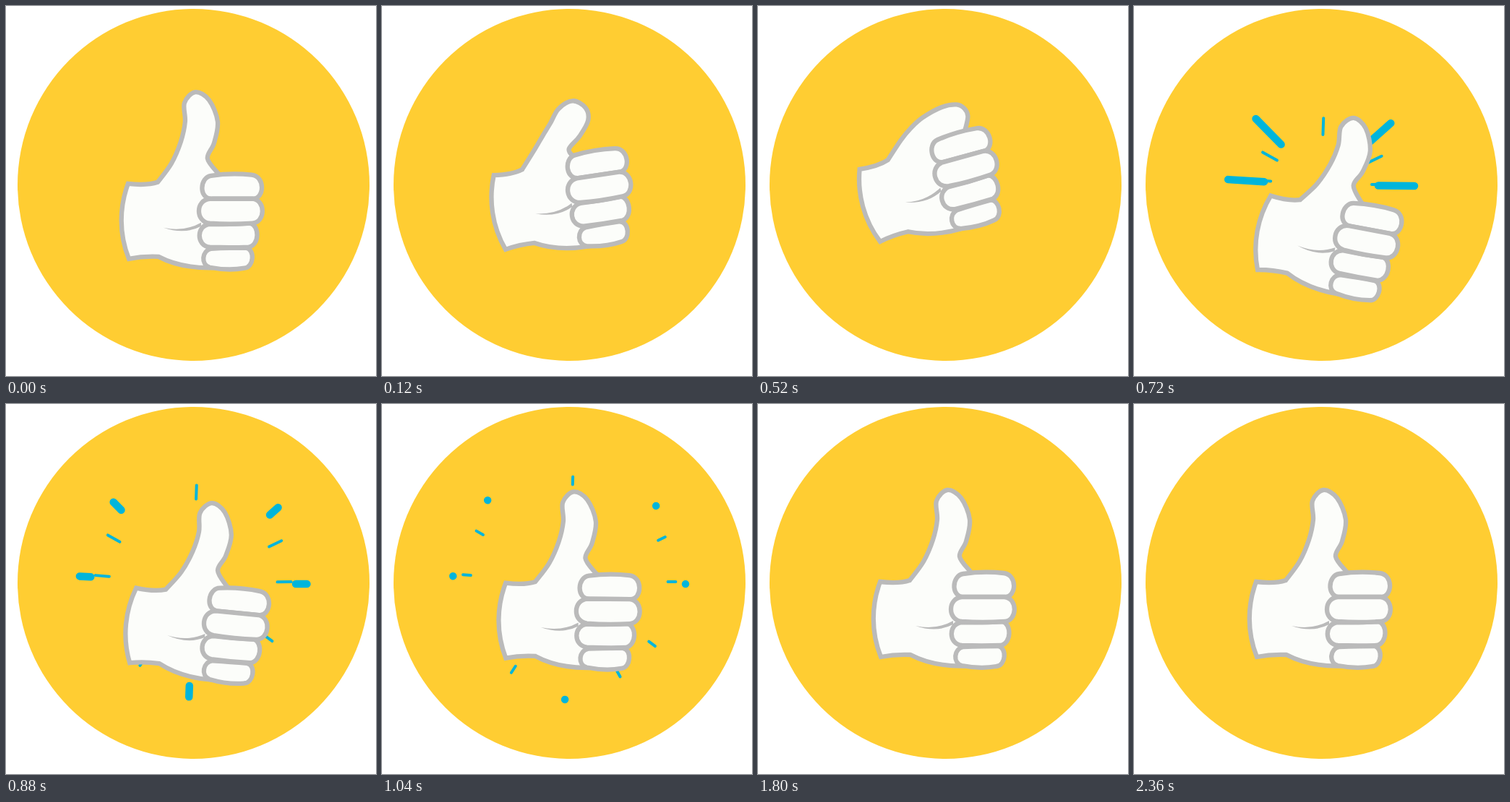
Recreate the animation shown at these times as an HTML page. Size 512 by 512 pixels, loop 2.4 s.

```html
<!DOCTYPE html>
<html lang="en">
<head>
<meta charset="utf-8">
<title>Thumbs up</title>
<style>
  html, body { margin: 0; width: 100%; height: 100%; overflow: hidden; background: #fff; }
  svg { display: block; width: 100vw; height: 100vh; }
  #rays { stroke: #00b5db; stroke-linecap: round; }
  #hand { fill: #fcfdfa; stroke: #bababa; stroke-width: 6.3; stroke: #bababa; }
  #hand .crease { fill: #bababa; stroke: none; }
</style>
</head>
<body>
<svg viewBox="0 0 512 512">
  <circle cx="259.5" cy="247.5" r="243.5" fill="#ffcd32"/>
  <g id="rays"></g>
  <g id="hand">
    <path id="palm"/>
    <path class="crease" d="M218 307Q247 313 270 300V305Q247 317 218 307Z"/>
    <path d="M286 267C266 268 268 237 284 235Q312 231 340 234C359 236 358 267 342 267Z"/>
    <path d="M284 336Q310 335 332 335C345 337 343 362 330 363Q308 367 282 362C269 358 271 339 284 336Z"/>
    <path d="M282 302Q310 303 338 301C351 304 351 331 336 334Q310 335 282 334C263 332 263 304 282 302Z"/>
    <path d="M282 267H341C360 269 359 300 341 301Q310 303 282 301C262 299 262 269 282 267Z"/>
  </g>
</svg>
<script>
const LOOP = 2400, CENTER = [259, 248];
const $ = id => document.getElementById(id);
const mix = (a, b, k) => a + (b - a) * k;
const clamp = v => Math.min(1, Math.max(0, v));

const linear = k => k;
const easeOut = k => 1 - (1 - k) ** 2;
const smooth = k => k * k * (3 - 2 * k);

// Thumb contour from wrist joint over the tip to the index finger
const THUMB = [
  [[210,244],[229,218],[242,188],[248,160],[247,134],[262,119],[281,130],[293,160],[288,190],[279,211],[294,232]],
  [[209,244],[231,218],[243,203],[257,186],[271,168],[292,160],[308,172],[309,190],[294,210],[277,225],[281,236]],
  [[210,244],[235,222],[252,210],[272,200],[302,193],[322,195],[331,203],[333,214],[327,227],[318,240],[310,245]]
];

// time, rotation, wrist x, wrist y, fold of the thumb, easing towards this pose
const POSES = [
  [0, 0, 170, 350, 0, linear],
  [120, -8.4, 171, 337, 1, linear],
  [360, -15.3, 169, 326, 2, easeOut],
  [560, -15.3, 169, 326, 2, linear],
  [720, 10.6, 171, 365, 0, smooth],
  [1040, 0.5, 171.3, 351.6, 0, smooth],
  [1160, 0, 170, 350, 0, easeOut],
  [LOOP, 0, 170, 350, 0, linear]
];

function poseAt(t) {
  const i = POSES.findIndex(p => p[0] > t);
  const a = POSES[i - 1], b = POSES[i];
  const k = b[5]((t - a[0]) / (b[0] - a[0]));
  return [1, 2, 3, 4].map(j => mix(a[j], b[j], k));
}

function spline(pts) {
  const at = i => pts[Math.min(pts.length - 1, Math.max(0, i))];
  const ctrl = (p, a, b, s) => p.map((v, j) => v + s * (b[j] - a[j]) / 6);
  let d = "";
  for (let i = 0; i < pts.length - 1; i++) {
    const c1 = ctrl(at(i), at(i - 1), at(i + 1), 1);
    const c2 = ctrl(at(i + 1), at(i), at(i + 2), -1);
    d += `C${c1} ${c2} ${at(i + 1)}`;
  }
  return d;
}

function palmPath(fold) {
  const i = Math.min(1, Math.floor(fold));
  const pts = THUMB[i].map((p, n) => p.map((v, j) => mix(v, THUMB[i + 1][n][j], fold - i)));
  return `M169 246Q195 249 ${pts[0]}${spline(pts)}` +
    "L320 250L300 350L285 362.5C255 363 230 357 211 347Q190 346 170 350C156 315 157 278 169 246Z";
}

const decay = (t, tau) => 1 - Math.exp(-Math.max(0, t - 603) / tau);
const BURSTS = [
  {
    width: 10.5, end: 1080,
    angles: [-134.5, -176.5, 0.4, -41.7, 92.1],
    outer: t => 161 * decay(t, 73),
    inner: t => 161 * (1 - (1 - clamp((t - 600) / 440)) ** 2.1)
  },
  {
    width: 4, end: 1200,
    angles: [-88, -150.6, -175.4, -0.8, -25.7, 36.2, 61.4, 122.9],
    outer: t => 152 * decay(t, 125),
    inner: t => 152 * decay(t, 191)
  }
];

for (const b of BURSTS) {
  b.lines = b.angles.map(angle => {
    const line = document.createElementNS("http://www.w3.org/2000/svg", "path");
    line.setAttribute("stroke-width", b.width);
    line.setAttribute("transform", `translate(${CENTER}) rotate(${angle})`);
    $("rays").append(line);
    return line;
  });
}

function draw(t) {
  const [turn, x, y, fold] = poseAt(t);
  $("hand").setAttribute("transform", `translate(${x} ${y}) rotate(${turn}) translate(-170 -350)`);
  $("palm").setAttribute("d", palmPath(fold));
  for (const b of BURSTS) {
    const on = t > 610 && t < b.end;
    const from = b.inner(t), to = Math.max(from + 0.01, b.outer(t));
    for (const line of b.lines) line.setAttribute("d", on ? `M${from} 0H${to}` : "");
  }
}

const start = performance.now();
function tick() {
  draw((performance.now() - start) % LOOP);
  requestAnimationFrame(tick);
}
draw(0);
requestAnimationFrame(tick);
</script>
</body>
</html>
```
